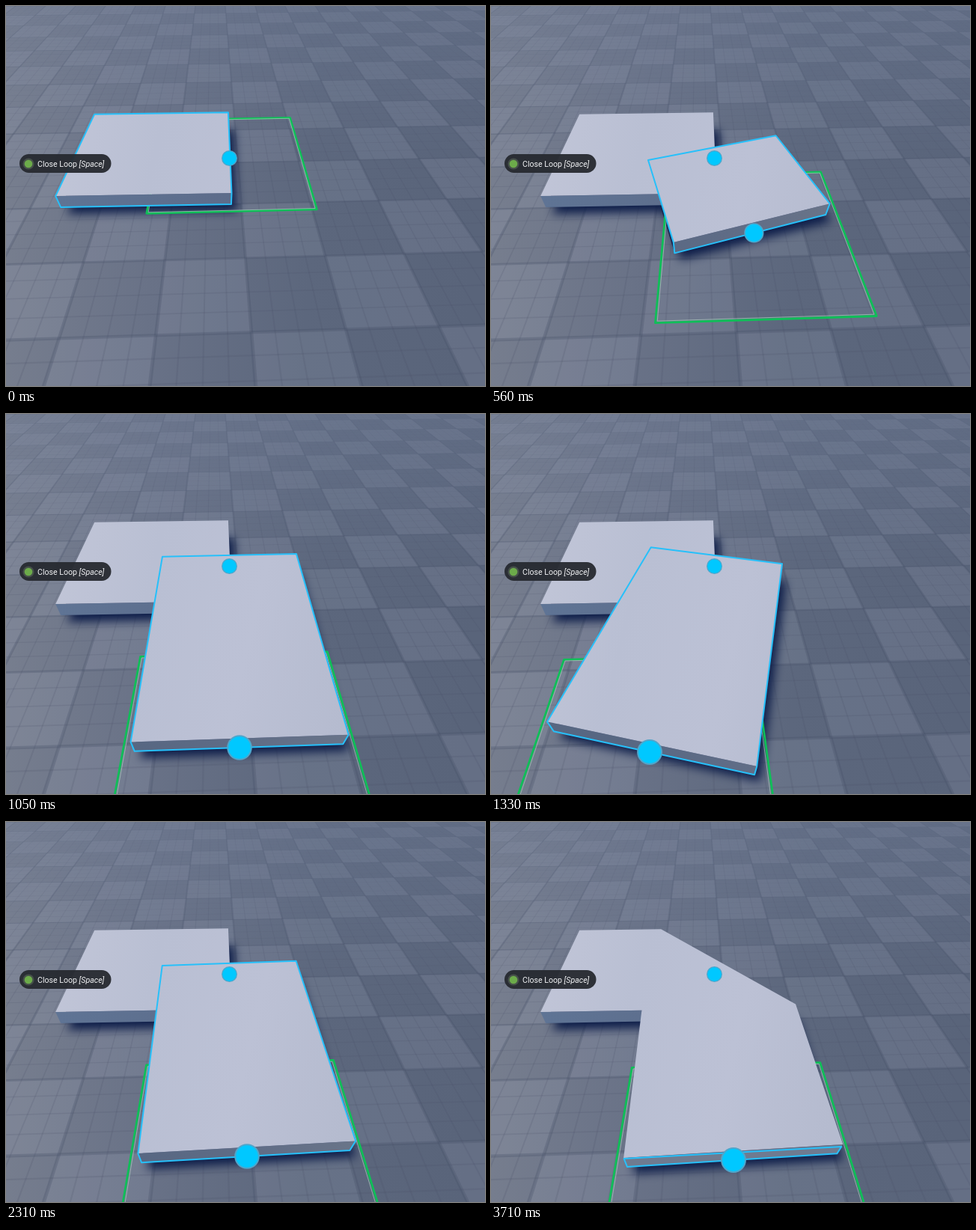
Animation, 640 px wide and 508 px high, one loop 4060 ms. Source, as an HTML page with a canvas:

```html
<!DOCTYPE html>
<html lang="en">
<head>
<meta charset="utf-8">
<title>Close Loop</title>
<style>
html, body { margin: 0; width: 100%; height: 100%; overflow: hidden; background: #626c80; }
canvas { display: block; width: 100vw; height: 100vh; }
</style>
</head>
<body>
<canvas id="stage" width="640" height="508"></canvas>
<script>
const W = 640, H = 508, LOOP = 4060, STEP = 70;
const BEGIN = 140, MERGE = 3290;
const stage = document.getElementById('stage');
const ctx = stage.getContext('2d');

// Ground perspective: horizon height, centre line, scale and slight yaw
const HORIZON = -200, VX = 277, SCALE = 660, YAW = 0.033;
const toGround = ([x, y]) => {
  const d = y - HORIZON, u = (x - VX) / d;
  return [u, SCALE / d - YAW * u];
};
const toScreen = ([u, z]) => {
  const d = SCALE / (z + YAW * u);
  return [VX + u * d, HORIZON + d];
};
// Raises a ground point to the top surface, away from the vertical vanishing point
const lift = ([x, y]) => {
  const k = 7e-5 * (y - HORIZON);
  return [x + (x - 285) * k, y + (y - 720) * k];
};
const mix = (a, b, p) => a.map((v, i) => v + (b[i] - v) * p);

function trace(c, pts) {
  c.beginPath();
  pts.forEach(([x, y]) => c.lineTo(x, y));
  c.closePath();
}
function fill(c, pts, style) {
  trace(c, pts);
  c.fillStyle = style;
  c.fill();
}
function outline(pts, style, width) {
  trace(ctx, pts);
  ctx.strokeStyle = style;
  ctx.lineWidth = width;
  ctx.lineJoin = 'round';
  ctx.stroke();
}
function disc(x, y, r, color) {
  ctx.beginPath();
  ctx.arc(x, y, r, 0, Math.PI * 2);
  ctx.fillStyle = color;
  ctx.fill();
}
function gradient(c, box, ...colors) {
  const g = c.createLinearGradient(...box);
  colors.forEach((color, i) => g.addColorStop(i / (colors.length - 1), color));
  return g;
}

function paintFloor() {
  const layer = document.createElement('canvas');
  layer.width = W;
  layer.height = H;
  const c = layer.getContext('2d');
  const CELL = 0.2, DEPTH = 0.192, U0 = 0.08, Z0 = 1.2267;
  const patch = (n0, n1, m0, m1, color) => {
    const u = n => U0 + n * CELL, z = m => Z0 + m * DEPTH;
    fill(c, [[n0, m0], [n1, m0], [n1, m1], [n0, m1]].map(([n, m]) => toScreen([u(n), z(m)])), color);
  };
  c.fillStyle = gradient(c, [0, 0, W, 40], '#787f8f', '#697287', '#5c677d', '#59647a');
  c.fillRect(0, 0, W, H);
  for (let m = -3; m < 14; m++)
    for (let n = -10; n < 11; n++)
      if ((m + n) % 2 === 0) patch(n, n + 1, m, m + 1, 'rgba(165,176,196,.15)');
  for (let i = -40; i <= 56; i++) {
    const major = i % 4 === 0, w = major ? 0.018 : 0.008;
    const color = `rgba(70,80,102,${major ? 0.3 : 0.17})`;
    patch(i / 4 - w, i / 4 + w, -3, 14, color);
    if (i >= -12) patch(-10, 14, i / 4 - w, i / 4 + w, color);
  }
  c.fillStyle = gradient(c, [0, 0, 0, 210], 'rgba(110,123,150,.36)', 'rgba(110,123,150,0)');
  c.fillRect(0, 0, W, H);
  return layer;
}

// Box of fixed width between two ground points
const HALF = 0.216;
function makeStrip(from, to) {
  const a = toGround(from), b = toGround(to);
  const du = b[0] - a[0], dz = b[1] - a[1], k = HALF / Math.hypot(du, dz);
  const corner = (p, s) => toScreen([p[0] - s * dz * k, p[1] + s * du * k]);
  const base = [corner(a, -1), corner(a, 1), corner(b, 1), corner(b, -1)];
  return { base, top: base.map(lift) };
}
const wall = ({ top, base }, i) => [top[i], top[i + 1], base[i + 1], base[i]];
// Outer contour when the wall after corner i faces the viewer
const contour = ({ top, base }, i) =>
  [...top.slice(0, i + 1), base[i], base[i + 1], ...top.slice(i + 1)];

function cross([ax, ay], [bx, by], [cx, cy], [dx, dy]) {
  const px = bx - ax, py = by - ay, qx = dx - cx, qy = dy - cy;
  const t = ((cx - ax) * qy - (cy - ay) * qx) / (px * qy - py * qx);
  return [ax + px * t, ay + py * t];
}
// Joins slab and panel into one bent shape with a cut outer corner
const join = (s, p) => [
  s[3], mix(s[3], s[0], 0.61), mix(p[1], p[2], 0.236),
  p[2], p[3], cross(p[0], p[3], s[1], s[2]), s[2]
];

const START = [298.5, 203.5];
const SLAB = makeStrip(START, [101, 206.5]);

// Cursor turns: time, x, y
const KEYS = [
  [140, 300, 207], [420, 317, 231], [630, 362, 338], [770, 363, 367], [1050, 312, 446],
  [1330, 212, 452], [1680, 322, 447], [2030, 241, 450], [2310, 322, 447], [3080, 324, 452]
];
// Smooth curve through the keys that never overshoots them
function follow(t, axis) {
  const slope = i => KEYS[i] && KEYS[i + 1]
    ? (KEYS[i + 1][axis] - KEYS[i][axis]) / (KEYS[i + 1][0] - KEYS[i][0]) : 0;
  const tangent = i => {
    const a = slope(i - 1), b = slope(i);
    return a * b > 0 ? 2 * a * b / (a + b) : 0;
  };
  const i = KEYS.findIndex(k => k[0] > t) - 1;
  if (i < 0) return KEYS[KEYS.length - 1][axis];
  const span = KEYS[i + 1][0] - KEYS[i][0], p = (t - KEYS[i][0]) / span, q = 1 - p;
  return KEYS[i][axis] * q * q * (1 + 2 * p) + KEYS[i + 1][axis] * p * p * (3 - 2 * p)
    + span * p * q * (q * tangent(i) - p * tangent(i + 1));
}
const cursorAt = t => t < BEGIN ? START : [follow(t, 1), follow(t, 2)];

const CYAN = '#27c0fa';
const floor = paintFloor();
const topPaint = gradient(ctx, [40, 230, 470, 330], '#c2c6d8', '#b9bfd3', '#bcc1d5', '#b5bbcf');
const slabPaint = gradient(ctx, [40, 0, 303, 0], '#5f7596', '#5d6c8a');
const frontPaint = gradient(ctx, [170, 0, 470, 0], '#576782', '#5f6c86', '#6a7589');

function shadow(base) {
  ctx.save();
  ctx.shadowColor = '#0c1c48';
  ctx.shadowBlur = 13;
  ctx.shadowOffsetX = 8;
  ctx.shadowOffsetY = 9;
  fill(ctx, base, '#17264f');
  ctx.restore();
}

function brush(at) {
  const [u, z] = toGround(at);
  const square = s => [[-1, 1], [1, 1], [1, -1], [-1, -1]]
    .map(([a, b]) => toScreen([u + a * 0.24 * s, z + b * 0.245 * s]));
  outline(square(1), '#0fbf58', 2.8);
  outline(square(0.983), 'rgba(165,200,185,.75)', 1);
}

function bubble([x, y]) {
  const r = 0.026 * (y - HORIZON);
  disc(x, y, r, '#4fa6cb');
  disc(x, y, r * 0.88, '#00c8ff');
}

function label() {
  ctx.beginPath();
  ctx.roundRect(18, 198, 122.5, 25, 12.5);
  ctx.fillStyle = 'rgba(38,42,48,.95)';
  ctx.fill();
  disc(30, 211, 7.6, '#46504a');
  disc(30, 211, 5.3, '#6cab4a');
  ctx.fillStyle = '#f2f3f5';
  ctx.font = '10.6px Roboto, sans-serif';
  ctx.fillText('Close Loop', 42, 214.7);
  const x = 42 + ctx.measureText('Close Loop ').width;
  ctx.font = 'italic 10.6px Roboto, sans-serif';
  ctx.fillText('[Space]', x, 214.7);
}

function drawBuild(t, cursor) {
  const panel = t >= BEGIN ? makeStrip(START, cursor) : null;
  const drawFront = () => fill(ctx, wall(panel, 2), frontPaint);
  const inside = cursor[1] < 262;
  shadow(SLAB.base);
  if (panel) shadow(panel.base);
  brush(cursor);
  if (panel && inside) drawFront();
  fill(ctx, wall(SLAB, 1), slabPaint);
  if (panel && !inside) drawFront();
  fill(ctx, SLAB.top, topPaint);
  if (panel) fill(ctx, panel.top, topPaint);
  outline(panel ? contour(panel, 2) : contour(SLAB, 1), CYAN, 2);
}

function drawMerged(cursor) {
  const panel = makeStrip(START, cursor);
  const top = join(SLAB.top, panel.top), base = join(SLAB.base, panel.base);
  const [a, b, c, d] = wall(panel, 2);
  const face = [mix(a, d, 0.25), mix(b, c, 0.1), c, d];
  shadow(base);
  brush(cursor);
  fill(ctx, [top[5], top[6], base[6], base[5]], slabPaint);
  fill(ctx, [a, b, c, d], frontPaint);
  fill(ctx, top, topPaint);
  fill(ctx, face, '#6f7b90');
  outline(face, CYAN, 2);
}

function draw(time) {
  const t = Math.floor((time % LOOP) / STEP) * STEP;
  const cursor = cursorAt(t);
  ctx.drawImage(floor, 0, 0);
  if (t < MERGE) drawBuild(t, cursor);
  else drawMerged(cursor);
  bubble(START);
  if (t >= BEGIN) bubble(cursor);
  label();
}

const origin = performance.now();
function tick() {
  draw(performance.now() - origin);
  requestAnimationFrame(tick);
}
tick();
</script>
</body>
</html>
```
